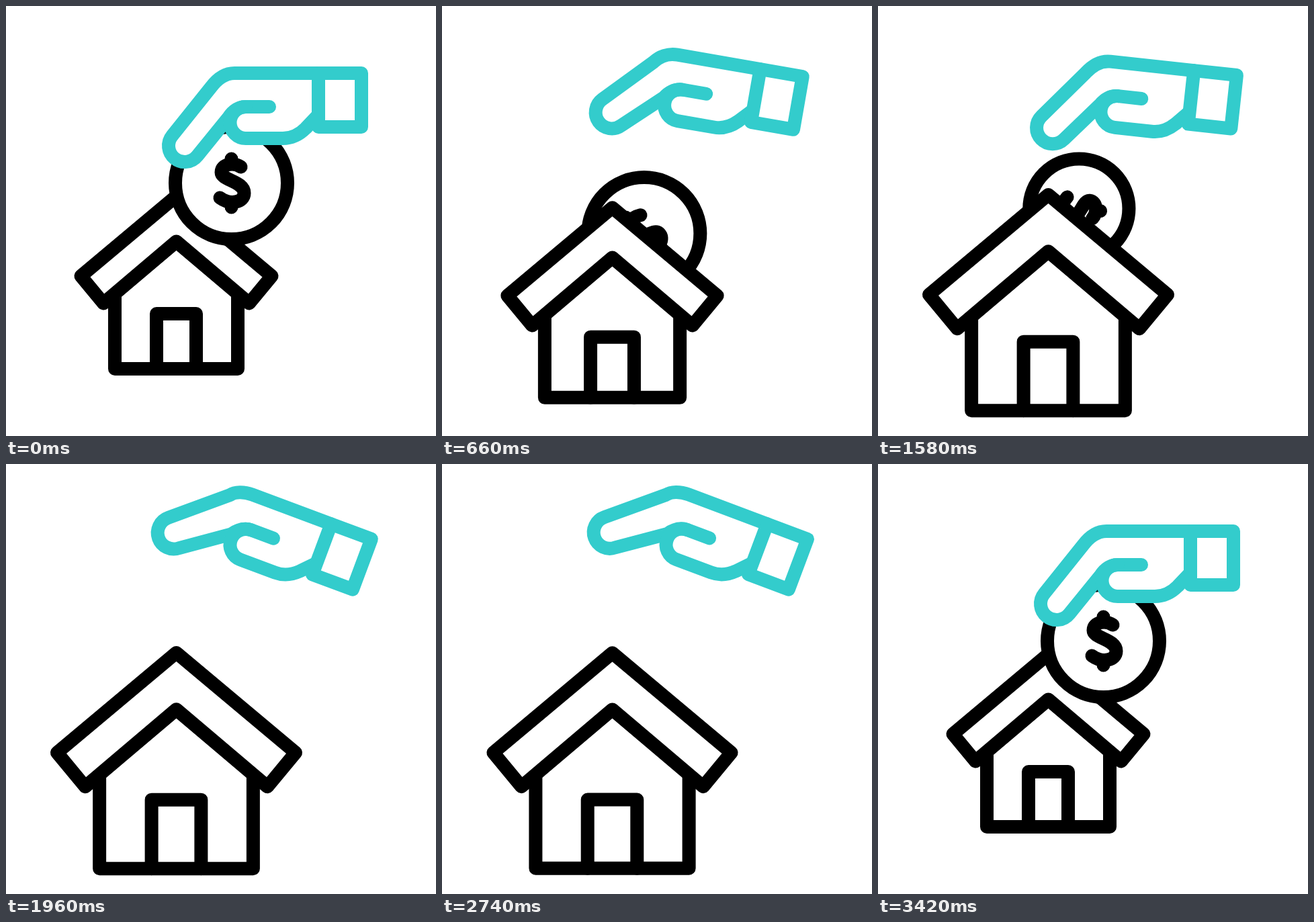
Animation, 640 px wide and 640 px high, one loop 3.6 s. Source, as an HTML page with a canvas:

```html
<!DOCTYPE html>
<html lang="en">
<head>
<meta charset="utf-8">
<title>Coins into a house</title>
<style>
  html, body { margin: 0; width: 100%; height: 100%; overflow: hidden; background: #fff; }
  canvas { display: block; width: 640px; height: 640px; }
</style>
</head>
<body>
<canvas id="stage" width="640" height="640"></canvas>
<script>
const ctx = document.getElementById('stage').getContext('2d');
const LOOP = 3600, END = 3420, TEAL = '#33cccc', BLACK = '#000';
const RAD = Math.PI / 180;

// The hand swings open and shut, turning at these times
const turns = [330, 1010, 1520, 1930, 2430, 2750, END];

// Coin poses
const rest = { x: 335.5, y: 263.5, angle: 0, scale: 1 };
const lifted = { x: 328, y: 230, angle: 30, scale: 1 };
const inside = { x: 280, y: 422, angle: 209, scale: 1 };
const dropFrom = { x: 342.5, y: 135, angle: -15, scale: .733 };
const dropTo = { x: 271.5, y: 409, angle: 168, scale: .987 };
const palmed = { x: 423, y: 155.5, angle: -54, scale: .71 };

const ease = p => (1 - Math.cos(Math.PI * p)) / 2;
const ramp = (t, from, to) => ease(Math.min(1, Math.max(0, (t - from) / (to - from))));
const lerp = (a, b, p) => a + (b - a) * p;

function mix(a, b, p) {
  const pose = {};
  for (const key in a) pose[key] = lerp(a[key], b[key], p);
  return pose;
}

function paint(path, color, fill) {
  if (fill) {
    ctx.fillStyle = '#fff';
    ctx.fill(path);
  }
  ctx.strokeStyle = color;
  ctx.stroke(path);
}

// Moves a path but keeps the line weight
function place(path, x, y, scale, angle = 0) {
  const p = new Path2D();
  p.addPath(path, new DOMMatrix().translate(x, y).rotate(angle).scale(scale));
  return p;
}

const ring = new Path2D();
ring.arc(0, 0, 83.5, 0, 2 * Math.PI);
const dollar = new Path2D('M14 -24C4 -31 -15 -29 -15 -16C-15 -4 19 -3 19 15C19 29 -2 33 -17 22' +
  'M0 -36V-30M0 30V36');
const walls = new Path2D('M-91.5 16V128.5H91.5V16L0 -61Z');
const door = new Path2D('M-29.5 128.5V46.5H29.5V128.5');
const roof = new Path2D('M0 -128.5L142 -9.5L108.5 31L0 -61L-108.5 31L-142 -9.5Z');
const cuff = new Path2D('M465 100H529V180H465Z');
const palm = new Path2D('M357 150A23.5 23.5 0 0 0 357 197H412C428 197 438 190 446 182L465 162');

function drawCoin({ x, y, angle, scale }, grow = 1) {
  paint(place(ring, x, y, scale * grow), BLACK, true);
  paint(place(dollar, x, y, scale * grow, angle), BLACK);
}

function drawHouse(t) {
  const y = 411.5 + 30 * (ramp(t, 0, 300) - ramp(t, 3160, END));
  const scale = 1 + .25 * (ramp(t, 400, 1000) - ramp(t, 2690, END));
  paint(place(walls, 253.5, y, scale), BLACK, true);
  paint(place(door, 253.5, y, scale), BLACK);
  paint(place(roof, 253.5, y, scale), BLACK, true);
}

function addFinger(path, open) {
  const dir = (-51 + 11 * open) * RAD;
  path.moveTo(465, 100);
  path.lineTo(340, 100);
  path.bezierCurveTo(326, 100, 314, 109 - 4 * open, 305 + 4 * open, 121 - 9 * open);
  path.arc(266 - 16 * open, 208 - 14 * open, 24, dir - Math.PI / 2, dir + Math.PI / 2, true);
  path.lineTo(331, 166);
}

function drawHand(t) {
  const open = turns.reduce((sum, from, i) =>
    i < turns.length - 1 ? sum + (-1) ** i * ramp(t, from, turns[i + 1]) : sum, 0);
  // Between drops the hand stays partly raised
  const midway = t > turns[1] && t < turns[5];
  const lift = midway ? lerp(.26, 1, open) : open;

  const body = new Path2D(), line = new Path2D();
  addFinger(body, open);
  body.bezierCurveTo(333, 190, 345, 197, 357, 197);
  body.lineTo(412, 197);
  body.bezierCurveTo(428, 197, 438, 190, 446, 182);
  body.lineTo(465, 162);
  addFinger(line, open);
  line.bezierCurveTo(337, 157, 345, 150, 357, 150);
  line.lineTo(392, 150);

  ctx.save();
  ctx.translate(504, 147);
  ctx.rotate(20.6 * lift * RAD);
  ctx.translate(-504, -147);
  ctx.fillStyle = '#fff';
  ctx.fill(body);
  paint(line, TEAL);
  paint(palm, TEAL);
  paint(cuff, TEAL, true);
  ctx.restore();
}

function draw(t) {
  ctx.fillStyle = '#fff';
  ctx.fillRect(0, 0, 640, 640);
  ctx.lineWidth = 20;
  ctx.lineCap = ctx.lineJoin = 'round';

  if (t >= 350 && t < 900) drawCoin(mix(lifted, inside, (t - 350) / 550));
  for (const start of [1180, 2070]) {
    const age = t - start;
    if (age > 0 && age < 660) drawCoin(mix(dropFrom, dropTo, age / 660), ramp(age, 0, 180));
  }
  drawHouse(t);
  if (t < 350) drawCoin(mix(rest, lifted, ramp(t, 0, 350)));
  if (t > 2790) drawCoin(mix(palmed, rest, ramp(t, 2790, END)), ramp(t, 2790, 2970));
  drawHand(t);
}

const start = performance.now();
function tick() {
  draw((performance.now() - start) % LOOP);
  requestAnimationFrame(tick);
}
tick();
</script>
</body>
</html>
```
